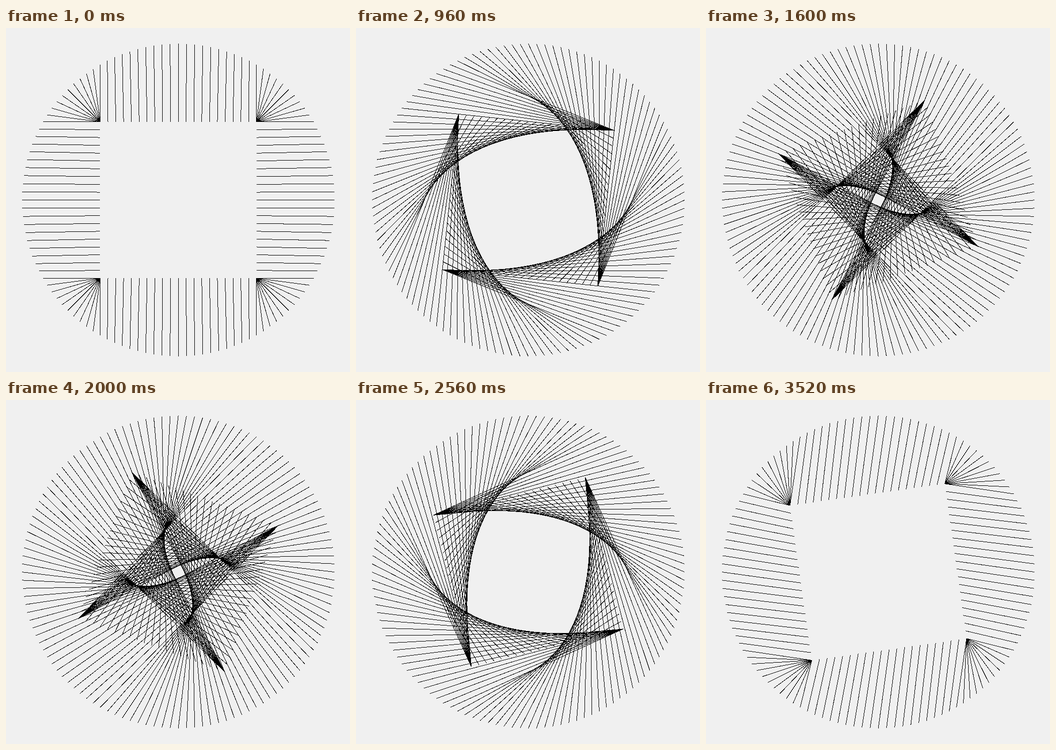
Animation of 685 by 685 pixels, one loop 3.6 s. Source, as an HTML page:

```html
<!DOCTYPE html>
<html lang="en">
<head>
<meta charset="utf-8">
<title>Square turning in a circle</title>
<style>
  html, body { margin: 0; width: 100%; height: 100%; overflow: hidden; background: #f0f0f0; }
  svg { display: block; }
</style>
</head>
<body>
<svg width="685" height="685" viewBox="0 0 685 685">
  <path id="threads" fill="none" stroke="#000" stroke-width="1" shape-rendering="crispEdges"/>
</svg>
<script>
const CX = 343.1, CY = 342.6, RADIUS = 311.3, HALF = RADIUS / 2;
const COUNT = 120, STEP_MS = 80, STEPS = 45;
const threads = document.getElementById('threads');

const place = (x, y, angle) => {
  const c = Math.cos(angle), s = Math.sin(angle);
  return `${(CX + x * c - y * s).toFixed(2)} ${(CY + x * s + y * c).toFixed(2)}`;
};

// Each quarter has 20 threads along a side and 10 gathered at its corner.
function draw(turn) {
  let d = '';
  for (let i = 0; i < COUNT; i++) {
    const side = Math.floor(i / 30) * Math.PI / 2;
    const along = Math.min(i % 30, 20) / 10 - 1;
    const rim = (i - 10) * 2 * Math.PI / COUNT;
    d += `M${place(0, -RADIUS, rim)}L${place(along * HALF, -HALF, side + turn)}`;
  }
  threads.setAttribute('d', d);
}

let shown = -1;
function tick() {
  const step = Math.floor(performance.now() / STEP_MS) % STEPS;
  if (step !== shown) {
    shown = step;
    draw(step / STEPS * 2 * Math.PI);
  }
  requestAnimationFrame(tick);
}
tick();
</script>
</body>
</html>
```
